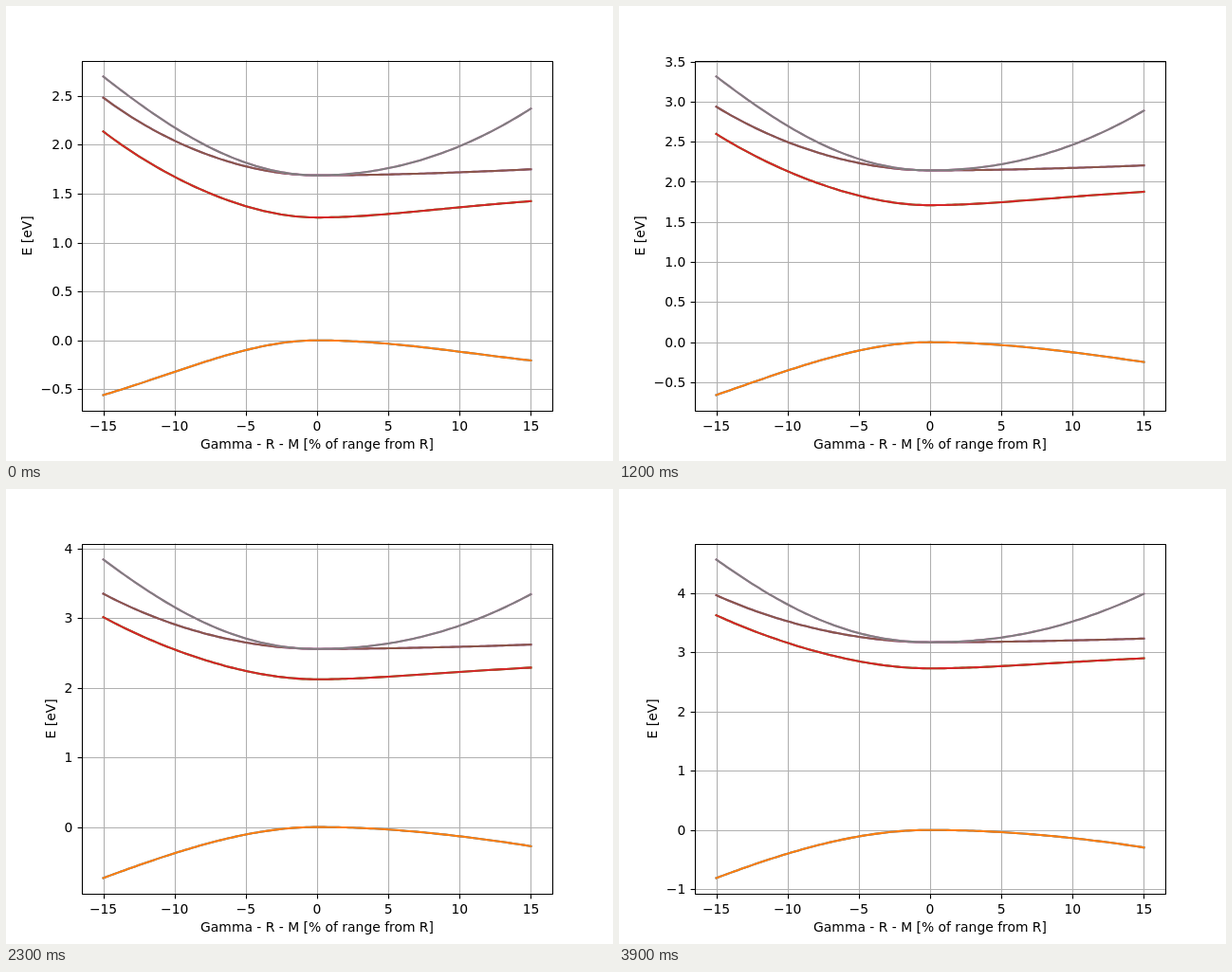
These frames come from a looping animation (640x480 px, 4 s). An HTML page with a canvas:

```html
<!DOCTYPE html>
<html>
<head>
<meta charset="utf-8">
<style>
  html, body { margin: 0; width: 100%; height: 100%; overflow: hidden; background: #fff; }
  canvas { display: block; }
</style>
</head>
<body>
<canvas id="chart" width="640" height="480"></canvas>
<script>
const ctx = document.getElementById('chart').getContext('2d');
const LEFT = 80, RIGHT = 576, TOP = 57.6, BOTTOM = 427.2;
const STEP_MS = 100, STEPS = 40;
const KEY_STEPS = [0, 19, 39], KEY_U = [1 / 3, 2 / 3, 1];

// Energy change from x = 0 at |x| = 5, 10, 15, given for each key step.
const bands = [
  { colors: ['#1f77b4', '#ff7f0e'], base: () => 0,
    left: [[-.100, -.322, -.559], [-.107, -.369, -.708], [-.109, -.400, -.811]],
    right: [[-.035, -.116, -.206], [-.036, -.131, -.266], [-.037, -.138, -.296]] },
  { colors: ['#2ca02c', '#d62728'], base: gap,
    left: [[.116, .416, .879], [.120, .427, .892], [.120, .430, .896]],
    right: [[.036, .104, .167], [.038, .106, .168], [.038, .107, .170]] },
  { colors: ['#9467bd', '#8c564b'], base: upper,
    left: Array(3).fill([.092, .354, .794]),
    right: Array(3).fill([.009, .031, .062]) },
  { colors: ['#e377c2', '#7f7f7f'], base: upper,
    left: [[.129, .489, 1.010], [.148, .586, 1.247], [.155, .638, 1.396]],
    right: [[.073, .298, .682], [.078, .330, .774], [.080, .350, .817]] }
];

function gap(n) { return 1.256 + .03772 * n; }
function upper(n) { return gap(n) + .431 + .00025 * n; }

// Parabola through three points.
function quad(x, [a, b, c], [ya, yb, yc]) {
  return ya * (x - b) * (x - c) / ((a - b) * (a - c))
       + yb * (x - a) * (x - c) / ((b - a) * (b - c))
       + yc * (x - a) * (x - b) / ((c - a) * (c - b));
}

function energy(band, x, n) {
  const u = Math.abs(x) / 15;
  const keys = x < 0 ? band.left : band.right;
  const curvature = KEY_U.map((k, i) => quad(n, KEY_STEPS, keys.map(v => v[i])) / (k * k));
  return band.base(n) + u * u * quad(u, KEY_U, curvature);
}

const snap = v => Math.round(v) + .5;
const toX = x => 328 + x * (RIGHT - LEFT) / 33;

function line(x1, y1, x2, y2, color) {
  ctx.strokeStyle = color;
  ctx.lineWidth = 1.11;
  ctx.beginPath();
  ctx.moveTo(x1, y1);
  ctx.lineTo(x2, y2);
  ctx.stroke();
}

function text(str, x, y, align) {
  ctx.textAlign = align;
  ctx.fillText(str, x, y);
}

function draw(n) {
  const low = energy(bands[0], -15, n), high = energy(bands[3], -15, n);
  const margin = (high - low) * .05;
  const min = low - margin, max = high + margin;
  const toY = e => BOTTOM - (e - min) / (max - min) * (BOTTOM - TOP);
  const step = max - min > 4.5 ? 1 : .5;

  ctx.fillStyle = '#fff';
  ctx.fillRect(0, 0, 640, 480);
  ctx.fillStyle = '#000';
  ctx.font = '13.89px "DejaVu Sans", sans-serif';

  for (let x = -15; x <= 15; x += 5) {
    const px = snap(toX(x));
    line(px, TOP, px, BOTTOM, '#b0b0b0');
    line(px, 427.5, px, 432.4, '#000');
    text(String(x).replace('-', '−'), toX(x), 448, 'center');
  }

  let labelWidth = 0;
  for (let i = Math.ceil(min / step); i * step <= max; i++) {
    const e = i * step, py = snap(toY(e));
    const label = e.toFixed(step < 1 ? 1 : 0).replace('-', '−');
    line(LEFT, py, RIGHT, py, '#b0b0b0');
    line(75.6, py, 80.5, py, '#000');
    text(label, 70.3, Math.round(toY(e) + 5.06), 'right');
    labelWidth = Math.max(labelWidth, ctx.measureText(label).width);
  }

  ctx.lineWidth = 2.08;
  ctx.lineJoin = 'round';
  ctx.lineCap = 'square';
  for (const band of bands) {
    ctx.beginPath();
    for (let x = -15; x <= 15; x += .25) ctx.lineTo(toX(x), toY(energy(band, x, n)));
    for (const color of band.colors) {
      ctx.strokeStyle = color;
      ctx.stroke();
    }
  }
  ctx.lineCap = 'butt';

  ctx.strokeStyle = '#000';
  ctx.lineWidth = 1.11;
  ctx.strokeRect(80.5, 58.5, 496, 369);

  text('Gamma - R - M [% of range from R]', 328, 467, 'center');
  ctx.save();
  ctx.translate(Math.floor(70.3 - labelWidth - 9), 242.4);
  ctx.rotate(-Math.PI / 2);
  text('E [eV]', 0, 0, 'center');
  ctx.restore();
}

function tick() {
  draw(Math.floor(performance.now() / STEP_MS) % STEPS);
  requestAnimationFrame(tick);
}
tick();
</script>
</body>
</html>
```
